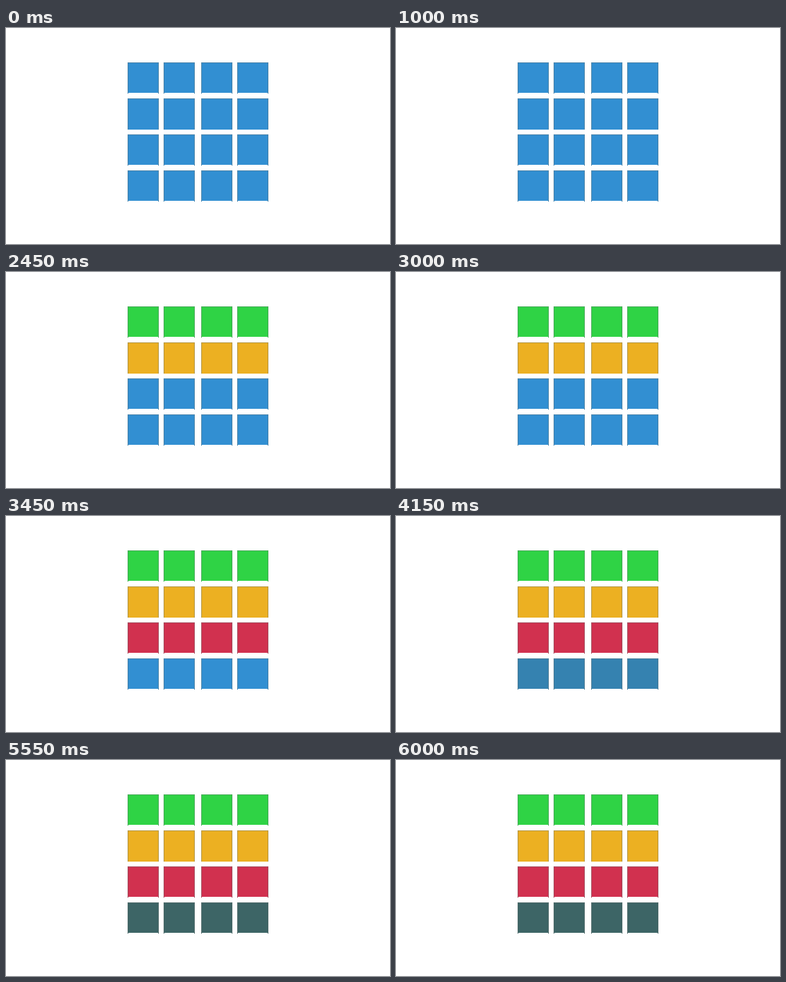
An HTML page with a canvas for the animation above (6.05 s loop, 480 px wide and 270 px high).

```html
<!DOCTYPE html>
<html lang="en">
<head>
<meta charset="utf-8">
<title>Colour grid</title>
<style>
  html, body { margin: 0; width: 100%; height: 100%; overflow: hidden; background: #fff; }
  canvas { display: block; }
</style>
</head>
<body>
<canvas id="stage" width="480" height="270"></canvas>
<script>
const ctx = document.getElementById('stage').getContext('2d');

const LOOP = 6050;
const STAGGER = 1000;
const FADE = 400;
const COLS = [152, 197, 244, 289];
const BLUE = [50, 143, 210];
const ROWS = [
  { y: 43, h: 38, color: [47, 211, 69] },
  { y: 88, h: 39, color: [236, 176, 34] },
  { y: 133, h: 38, color: [209, 49, 79] },
  { y: 178, h: 38, color: [61, 101, 102] }
];

const ease = p => (1 - Math.cos(Math.PI * p)) / 2;
const clamp = p => Math.min(1, Math.max(0, p));
const mix = (a, b, p) => a.map((v, i) => Math.round(v + (b[i] - v) * p));
const rgb = c => `rgb(${c.join(',')})`;

function drawTile(x, y, h, color) {
  ctx.fillStyle = rgb(color);
  ctx.fillRect(x, y, 39, h);
  // thin darker rim on the left, top and right
  ctx.fillStyle = rgb(mix(color, [110, 120, 120], 0.4));
  ctx.fillRect(x, y, 1, 39);
  ctx.fillRect(x, y, 39, 1);
  ctx.fillRect(x + 38, y, 1, 39);
}

function draw(t) {
  ctx.fillStyle = '#fff';
  ctx.fillRect(0, 0, 480, 270);
  ROWS.forEach((row, i) => {
    const p = ease(clamp((t - STAGGER * (i + 1)) / FADE));
    const color = mix(BLUE, row.color, p);
    COLS.forEach(x => drawTile(x, row.y, row.h, color));
  });
}

const start = performance.now();
function tick() {
  draw((performance.now() - start) % LOOP);
  requestAnimationFrame(tick);
}
tick();
</script>
</body>
</html>
```
